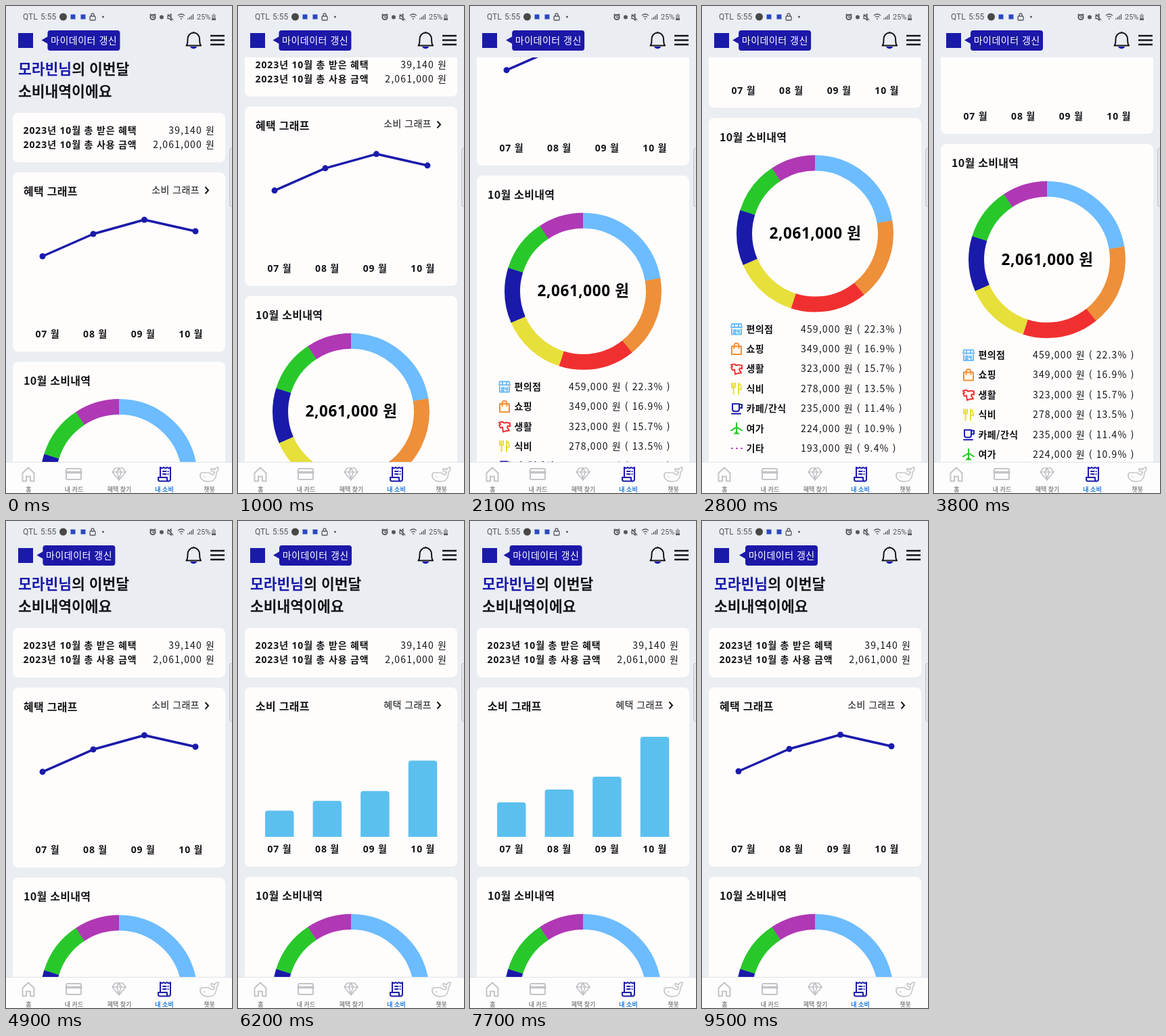
An HTML page that plays this animation: 334 px wide and 720 px high, repeating every 9600 ms.

```html
<!DOCTYPE html>
<html lang="ko">
<head>
<meta charset="utf-8">
<title>이번달 소비내역</title>
<style>
html, body { margin: 0; width: 100%; height: 100%; overflow: hidden; background: #eaedf2; }
svg { display: block; width: 100vw; height: 100vh; }
text { font-family: "Noto Sans CJK KR", "Noto Sans CJK", "Noto Sans CJK JP", "Noto Sans", sans-serif; fill: #141418; white-space: pre; }
.b { font-weight: 700; }
.h { font-size: 21.5px; font-weight: 700; }
.t { font-size: 16px; font-weight: 700; letter-spacing: .3px; }
.m { font-size: 14px; letter-spacing: 1.15px; }
.n { font-size: 14px; letter-spacing: .4px; }
.mb { font-size: 14px; letter-spacing: .9px; font-weight: 700; }
.mb, .total { font-family: "Noto Sans", "Noto Sans CJK KR", "Noto Sans CJK JP", sans-serif; }
.total { font-size: 22.5px; font-weight: 700; letter-spacing: .6px; }
.mid { text-anchor: middle; }
.end { text-anchor: end; }
.status text { font: 12px Roboto, sans-serif; fill: #55585e; }
.nav text { font-size: 9px; font-weight: 700; fill: #8b8b90; }
.nav .on { fill: #1a78dc; }
.card { fill: #fffdfc; }
.ic { fill: none; stroke-width: 2; stroke-linejoin: round; stroke-linecap: round; }
</style>
</head>
<body>
<svg viewBox="0 0 334 720" preserveAspectRatio="none">
  <defs><clipPath id="view"><rect y="76" width="334" height="598"/></clipPath></defs>
  <rect width="334" height="720" fill="#eaedf2"/>

  <g clip-path="url(#view)"><g id="page">
    <text class="h" x="18" y="101"><tspan fill="#1a1aaa">모라빈님</tspan>의 이번달</text>
    <text class="h" x="18" y="134">소비내역이에요</text>

    <rect class="card" x="10" y="158" width="314" height="73" rx="8"/>
    <text class="mb" x="25.500" y="189">2023년 10월 총 받은 혜택</text>
    <text class="mb" x="25.500" y="210">2023년 10월 총 사용 금액</text>
    <text class="m end" x="309" y="189">39,140 원</text>
    <text class="m end" x="309" y="210">2,061,000 원</text>

    <rect class="card" x="10" y="246" width="314" height="265" rx="8"/>
    <text class="t" id="title" x="26" y="280">혜택 그래프</text>
    <text class="n end" id="other" x="286" y="276.500">소비 그래프</text>
    <path d="M294.500 267.500l4.500 5-4.500 5" fill="none" stroke="#141418" stroke-width="2"/>
    <g id="line" fill="#1a1aaa"><polyline fill="none" stroke="#1a1aaa" stroke-width="3.500" stroke-linejoin="round"/></g>
    <g id="bars" fill="#5cc0ef"></g>
    <g id="months"></g>

    <rect class="card" x="10" y="526" width="314" height="514" rx="8"/>
    <text class="t" x="26" y="560">10월 소비내역</text>
    <g id="ring" fill="none" stroke-width="23"></g>
    <text class="total mid" x="167.500" y="704.500" style="fill:#000">2,061,000 원</text>
    <g id="list"></g>
  </g></g>

  <g class="status">
    <text x="25" y="20">QTL</text><text x="51" y="20">5:55</text>
    <circle cx="84.500" cy="16" r="5.500" fill="#484848"/>
    <rect x="95.500" y="12.500" width="7" height="7" fill="#2a48c0"/>
    <rect x="110.500" y="12.500" width="7" height="7" fill="#2a48c0"/>
    <g fill="none" stroke="#55585e" stroke-width="1.300">
      <rect x="124" y="15" width="8" height="6" rx="1"/><path d="M126 15v-2a2 2 0 0 1 4 0v2"/>
      <circle cx="217" cy="16.500" r="3.600" stroke-width="2"/><path d="M212.500 13.500l2-2M221.500 13.500l-2-2M217 14.500v2.500h2"/>
      <path d="M239 14.500h2l3-2.500v9l-3-2.500h-2zM239 12l8 9"/>
      <path d="M254 14q5-4 10 0M256 16.500q3-2.400 6 0M258 19h2"/>
      <path d="M269 20v-2M271.500 20v-4M274 20v-6M276.500 20v-8"/>
    </g>
    <circle cx="230" cy="16.500" r="3" fill="#55585e"/>
    <circle cx="143.500" cy="16" r="1.500" fill="#55585e"/>
    <text x="282" y="20" style="font-size:11px">25%</text>
    <path d="M304 13h1.500v-1.500h3V13h1.500v8h-6z" fill="#a4a7ac"/><rect x="304" y="18.500" width="6" height="2.500" fill="#55585e"/>
  </g>

  <rect x="18" y="40" width="22" height="22" fill="#1a1aaa"/>
  <g id="bubble">
    <rect x="59" y="36" width="107" height="30" rx="4" fill="#1c18a8"/>
    <path d="M50 50.500l9.500-5.500v11z" fill="#1c18a8"/>
    <text class="mid" x="112.700" y="56" font-size="14" letter-spacing=".5" style="fill:#fff">마이데이터 갱신</text>
  </g>
  <path d="M272.500 60a5 4 0 0 0 9.500 0" fill="#1a1aaa" stroke="#1a1aaa"/>
  <path class="ic" d="M266.500 58.500c1.500-1.500 2-3 2-9.500a8.800 9.500 0 0 1 17.600 0c0 6.500 .5 8 2 9.500z" stroke="#141418" style="fill:#eaedf2"/>
  <path d="M277.300 40v-2" stroke="#141418" stroke-width="2.500"/>
  <path d="M302 44h21M302 50.500h21M302 57h21" stroke="#141418" stroke-width="2.300"/>

  <rect x="330.500" y="210" width="10" height="87" rx="4" fill="#e1e4e8" stroke="#bfc3c8"/>

  <g class="nav">
    <rect y="674" width="334" height="46" fill="#fefdfd"/>
    <path d="M0 674.500h334" stroke="#dfe1e6"/>
    <g class="ic" stroke="#c3c3c8">
      <path d="M24.500 690.500l8.500-8 8.500 8v12h-5.500v-7h-6v7h-5.500z"/>
      <rect x="89" y="684" width="22" height="16" rx="2"/><path d="M89 689.500h22" stroke-width="3.500"/>
      <path d="M161.500 683h11l4.500 6-10 12-10-12zM157 689h20M164 689l3 11 3-11-3-6z" stroke-width="1.700"/>
      <path d="M290 690h9c3 0 4 3 6 3s3-2 3-4c-4 0-5-3-5-5 3 0 4 0 5 2 1-3 3-4 6-4 0 4-1 6-3 7 0 9-3 14-12 14-8 0-12-4-12-10 0-2 1-3 3-3zM293 696h1" stroke-width="1.600"/>
    </g>
    <path class="ic" stroke="#1a1aaa" stroke-width="2.300" d="M228 697v-15l2.500 1.500 2.500-1.500 2.500 1.500 2.500-1.500 2.500 1.500 2.500-1.500v18a2.500 2.500 0 0 1-2.500 2.500h-13a2.500 2.500 0 0 1-2.500-2.500v-3h13v3a2.500 2.500 0 0 0 2.500 2.500M232 688h4.500M232 692h4.500M239.500 688h.2M239.500 692h.2"/>
    <text class="mid" x="33.500" y="717.500">홈</text>
    <text class="mid" x="100.500" y="717.500">내 카드</text>
    <text class="mid" x="167.500" y="717.500">혜택 찾기</text>
    <text class="mid on" x="234" y="717.500">내 소비</text>
    <text class="mid" x="300.500" y="717.500">챗봇</text>
  </g>
</svg>

<script>
const $ = id => document.getElementById(id);
function add(parent, tag, attrs, text) {
  const el = document.createElementNS('http://www.w3.org/2000/svg', tag);
  for (const k in attrs) el.setAttribute(k, attrs[k]);
  if (text) el.textContent = text;
  parent.appendChild(el);
  return el;
}

const LOOP = 9600, BASE = 467;
const TO_BARS = 5900, TO_LINE = 8500, GROW = 1000;

// name, thousands of won, percent, colour, icon path in an 18px box
const spend = [
  ['편의점', 459, 22.3, '#6cbcff', 'M2 1.500h14l1 5H1zM2 9v8h14V9M6 2v5M12 2v5M5 10.500h3v2H5v2.500h3M10.500 10.500v2.500H13M13 10.500V15'],
  ['쇼핑', 349, 16.9, '#ee8f3a', 'M2 5h14v12H2zM5.500 8V4a3.500 3.500 0 0 1 7 0v4'],
  ['생활', 323, 15.7, '#f03030', 'M1 3l5-1q2 3 6 1l5 1v5l-3-1-1 2 3 5q-5 0-9 2l-1-7-3 1-2-4 2-1z'],
  ['식비', 278, 13.5, '#e7df3a', 'M2 1v5q0 2 2.500 2T7 6V1M4.500 1v16M12 17V1q4 2 4 9h-4'],
  ['카페/간식', 235, 11.4, '#1a1aaa', 'M3 2h10v8q0 3-3 3H6q-3 0-3-3zM13 3h4v5h-4M2 16.500h13'],
  ['여가', 224, 10.9, '#28c82a', 'M9 1v16M9 7l-8 5M9 7l8 5M9 14l-3 3M9 14l3 3'],
  ['기타', 193, 9.4, '#b038b4', 'M2 9h1M9 9h1M16 9h1']
];

const R = 104.5, CIRC = 2 * Math.PI * R;
let sum = 0;
spend.forEach(([name, won, pct, color, icon], i) => {
  const len = won / 2061 * CIRC;
  add($('ring'), 'circle', {
    cx: 167, cy: 697, r: R, stroke: color, transform: 'rotate(-90 167 697)',
    'stroke-dasharray': `${len + .3} ${CIRC}`, 'stroke-dashoffset': -sum
  });
  sum += len;
  const y = 838 + 29.4 * i;
  add($('list'), 'path', { class: 'ic', d: icon, stroke: color, transform: `translate(42 ${y - 9})` });
  add($('list'), 'text', { class: 'n b', x: 65.5, y: y + 5 }, name);
  add($('list'), 'text', { class: 'm', x: 146, y: y + 5 }, `${won},000 원 ( ${pct}% )`);
});

const dots = [[54, 370], [129, 337], [204.5, 316], [280, 333]];
const tops = [416, 397, 378, 319];
const poly = $('line').firstElementChild;
const marks = dots.map(([x]) => add($('line'), 'circle', { cx: x, r: 4.5 }));
const bars = tops.map((_, i) => {
  const x = 40 + 70.6 * i;
  add($('months'), 'text', { class: 'mb mid', x: x + 21.5, y: 490 }, ['07', '08', '09', '10'][i] + ' 월');
  return add($('bars'), 'path', { transform: `translate(${x} ${BASE})` });
});

const scrollKeys = [[0, 0], [500, 0], [650, 15], [1000, 97], [1500, 190], [2100, 275], [2600, 345], [2900, 368],
  [3500, 368], [3650, 358], [3800, 322.5], [4200, 110], [4450, 15], [4550, 0]];
const stretchKeys = [[4550, 0], [4680, .012], [4900, .003], [5000, 0]];

function track(keys, t) {
  if (t <= keys[0][0]) return keys[0][1];
  for (let i = 1; i < keys.length; i++) {
    const [a, u] = keys[i - 1], [b, v] = keys[i];
    if (t <= b) return u + (v - u) * (t - a) / (b - a);
  }
  return keys[keys.length - 1][1];
}
const easeOut = p => 1 - (1 - Math.min(1, p)) ** 4;

function drawChart(t) {
  const showBars = t >= TO_BARS && t < TO_LINE;
  const grow = t < TO_BARS ? 1 : easeOut((t - (showBars ? TO_BARS : TO_LINE)) / GROW);
  $('title').textContent = showBars ? '소비 그래프' : '혜택 그래프';
  $('other').textContent = showBars ? '혜택 그래프' : '소비 그래프';
  $('bars').style.display = showBars ? '' : 'none';
  $('line').style.display = showBars ? 'none' : '';
  if (showBars) {
    bars.forEach((bar, i) => {
      const h = (BASE - tops[i]) * grow, r = Math.min(4, h);
      bar.setAttribute('d', `M0 0V${r - h}q0 ${-r} ${r} ${-r}H${42.5 - r}q${r} 0 ${r} ${r}V0z`);
    });
  } else {
    const pts = dots.map(([x, y]) => [x, BASE + (y - BASE) * grow]);
    poly.setAttribute('points', pts.join(' '));
    marks.forEach((m, i) => m.setAttribute('cy', pts[i][1]));
  }
}

function draw(now) {
  const t = now % LOOP;
  const stretch = 1 + track(stretchKeys, t);
  const y = 76 * (1 - stretch) - track(scrollKeys, t);
  $('page').setAttribute('transform', `translate(0 ${y}) scale(1 ${stretch})`);
  const sway = 5 * Math.cos(2 * Math.PI * (t - 9500) / 1036);
  $('bubble').setAttribute('transform', `translate(${sway} 0)`);
  drawChart(t);
}

const start = performance.now();
function tick() {
  draw(performance.now() - start);
  requestAnimationFrame(tick);
}
tick();
</script>
</body>
</html>
```
